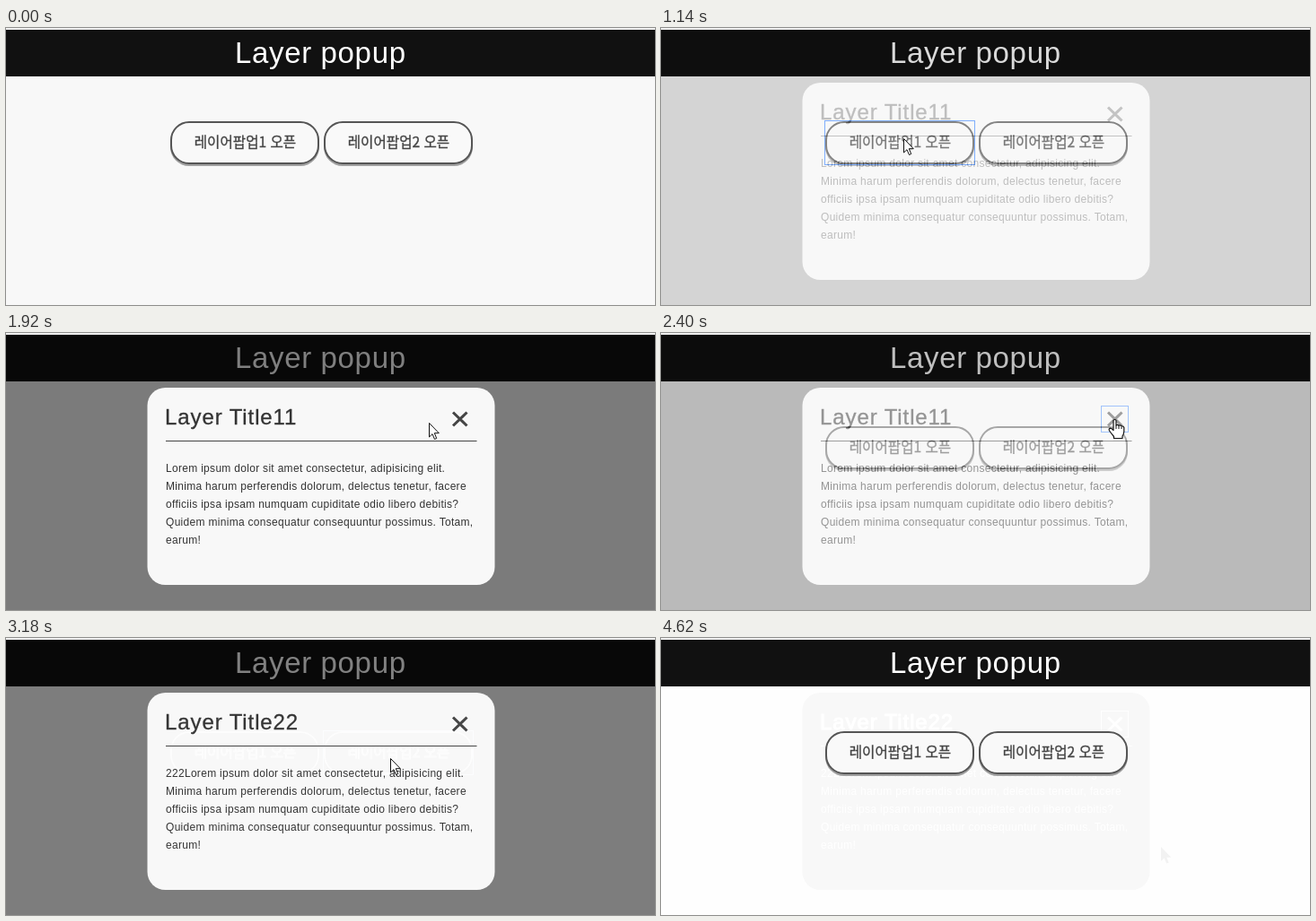
An HTML page for the animation above (5.52 s loop, 723 by 309 pixels).

```html
<!DOCTYPE html>
<html lang="ko">
<head>
<meta charset="utf-8">
<title>Layer popup</title>
<style>
html, body { margin: 0; width: 100%; height: 100%; overflow: hidden; background: #f8f8f8; }
svg { display: block; width: 100%; height: 100%; }
text { font-family: "Liberation Sans", Arial, sans-serif; white-space: pre; }
.head { font-size: 33px; letter-spacing: .65px; fill: #fff; }
.label { font: 15.6px "Noto Sans CJK KR", "Noto Sans CJK", sans-serif; text-anchor: middle; fill: #444; stroke: #444; stroke-width: .35; }
.title { font-size: 24px; letter-spacing: .9px; fill: #333; stroke: #333; stroke-width: .3; }
.body { font-size: 12px; letter-spacing: .3px; fill: #333; }
.rule { stroke: #444; }
.cross { stroke: #444; stroke-width: 3; }
.ring { fill: none; stroke: #4d90fe; }
.pale .label { fill: #fff; stroke: #fff; stroke-width: 1; }
.pale .title { fill: #fff; stroke: #fff; stroke-width: 1; }
.pale .body { fill: #fff; }
.pale .rule, .pale .cross, .pale .ring { stroke: #fff; }
</style>
</head>
<body>
<svg id="stage" viewBox="0 0 723 309" preserveAspectRatio="none"></svg>
<script>
const LOOP = 5520, STEP = 60, FADE = 230;
const stage = document.getElementById('stage');

const buttons = [
  { x: 183, y: 104, w: 166, h: 48, label: '레이어팝업1 오픈' },
  { x: 354, y: 104, w: 166, h: 48, label: '레이어팝업2 오픈' }
];
const closeBox = { x: 491, y: 82, w: 29, h: 28 };

// Press and fade times of each popup
const popups = [
  { title: 'Layer Title11', lead: '', press: 1020, open: 1057, closePress: 2220, close: 2285 },
  { title: 'Layer Title22', lead: '222', press: 2880, open: 2965, closePress: 3960, close: 3966 }
];
const lines = [
  'Lorem ipsum dolor sit amet consectetur, adipisicing elit.',
  'Minima harum perferendis dolorum, delectus tenetur, facere',
  'officiis ipsa ipsam numquam cupiditate odio libero debitis?',
  'Quidem minima consequatur consequuntur possimus. Totam,',
  'earum!'
];

// Pointer stops: time, x, y
const path = [
  [60, 672, 44], [600, 277, 116], [720, 270, 123], [1560, 270, 123],
  [2040, 505, 96], [2460, 505, 96], [2760, 428, 134], [3420, 428, 134],
  [3840, 514, 96], [4200, 514, 96], [4560, 557, 233], [4620, 557, 233]
];

const ring = (id, b) =>
  `<rect id="${id}" class="ring" x="${b.x - .5}" y="${b.y - .5}" width="${b.w + 1}" height="${b.h + 1}"/>`;

const outline = (b, attrs) =>
  `<rect x="${b.x + 1}" y="${b.y + 1}" width="${b.w - 2}" height="${b.h - 2}" rx="20" stroke-width="2" ${attrs}/>`;

const label = b => `<text class="label" x="${b.x + b.w / 2 + .5}" y="133">${b.label}</text>`;

const button = (b, i) => `
  <rect x="${b.x}" y="${b.y + 2}" width="${b.w}" height="${b.h}" rx="21" fill="#a0a0a0"/>
  ${outline(b, 'fill="#f9f9f9" stroke="#555"')}${label(b)}${ring('ring' + i, b)}`;

// White imprint of the buttons behind the popup text
const shade = i => `<g id="shade${i}" class="pale">
  ${buttons.map(b => outline(b, 'fill="none" stroke="#fff"') + label(b)).join('')}
  ${ring('shadeRing' + i, buttons[i])}</g>`;

const panel = '<rect x="157.5" y="61" width="387" height="220" rx="20" fill="#f8f8f8"/>';

const content = (p, ringId, under = '') => `${panel}${under}
  <text class="title" x="177" y="101.5">${p.title}</text>
  <path class="rule" d="M178 120.5H524.5"/>
  <path class="cross" d="M498 88.5L513.5 103.5M513.5 88.5L498 103.5"/>
  ${lines.map((s, i) => `<text class="body" x="178" y="${155 + 20 * i}">${i ? s : p.lead + s}</text>`).join('')}
  ${ring(ringId, closeBox)}`;

stage.innerHTML = `
  <rect width="723" height="309" fill="#f8f8f8"/>
  ${popups.map((p, i) => `<g id="trace${i}" class="pale">
    <rect y="54" width="723" height="255" fill="#fefefe"/>${content(p, 'traceRing' + i)}</g>`).join('')}
  <rect y="2" width="723" height="52" fill="#111"/>
  <rect width="723" height="2" fill="#eee"/>
  <text class="head" x="255" y="39">Layer popup</text>
  ${buttons.map(button).join('')}
  ${popups.map((p, i) => `<g id="layer${i}">
    <rect y="2" width="723" height="307" fill="#000" fill-opacity=".5"/>${content(p, 'closeRing' + i, shade(i))}</g>`).join('')}
  <path id="lost" transform="translate(557 233)" fill="#f2f2f2" d="M0 0V16L3.7 12.5 6.2 18.5 8.7 17.4 6.2 11.7H11.3Z"/>
  <g id="pointer" stroke="#111" stroke-linejoin="round">
    <path id="arrow" fill="#fff" d="M.5 .5V16L4 12.7 6.5 18.5 8.7 17.5 6.3 11.7H11.3Z"/>
    <g id="hand">
      <path fill="#fff" stroke-width="1.2" d="M-1 1.5Q.5-.5 2 1.5V7Q3.5 5.5 5 7.3 6.5 6 8 8 10 7.3 10.8 9.5V14Q10.5 17 9 19V21.5H-.5V19.5Q-3 16.5-5.5 13-6.5 10.5-4.5 10.2-3 10.3-1 12.5Z"/>
      <path fill="none" d="M2 7V11M5 7.5V11M8 8.5V11"/>
    </g>
  </g>`;

const el = {};
stage.querySelectorAll('[id]').forEach(n => el[n.id] = n);

const show = (node, alpha) => {
  node.style.display = alpha > 0 ? '' : 'none';
  node.setAttribute('opacity', +alpha);
};
const swing = p => .5 - Math.cos(Math.PI * Math.min(1, Math.max(0, p))) / 2;
const inside = (b, x, y) => x >= b.x && x <= b.x + b.w && y >= b.y && y <= b.y + b.h;
const within = (t, from, to) => t >= from && t < to;

function pointerAt(t) {
  const i = path.findIndex(k => k[0] > t);
  if (i < 1) return null;
  const [t0, x0, y0] = path[i - 1], [t1, x1, y1] = path[i];
  const k = swing((t - t0) / (t1 - t0));
  return [Math.round(x0 + (x1 - x0) * k), Math.round(y0 + (y1 - y0) * k)];
}

function draw(time) {
  const t = Math.floor(time / STEP) * STEP;
  const alphas = popups.map(p => swing((t - p.open) / FADE) - swing((t - p.close) / FADE));
  const open = Math.max(...alphas) > .03;

  popups.forEach((p, i) => {
    const next = popups[i + 1];
    const gone = t >= p.close + FADE;
    show(el['layer' + i], alphas[i]);
    show(el['ring' + i], within(t, p.press, p.closePress));
    show(el['closeRing' + i], t >= p.closePress);
    show(el['shade' + i], within(t, p.open + 180, p.open + 540));
    show(el['trace' + i], gone ? (next ? 1 - swing((t - next.open) / FADE) : 1) : 0);
  });
  show(el.lost, t >= 4620);

  const pos = pointerAt(t);
  show(el.pointer, pos !== null);
  if (!pos) return;
  const targets = open ? [closeBox] : buttons;
  const hover = targets.some(b => inside(b, ...pos));
  show(el.hand, hover);
  show(el.arrow, !hover);
  el.pointer.setAttribute('transform', `translate(${pos})`);
}

const start = performance.now();
function tick() {
  draw((performance.now() - start) % LOOP);
  requestAnimationFrame(tick);
}
tick();
</script>
</body>
</html>
```
